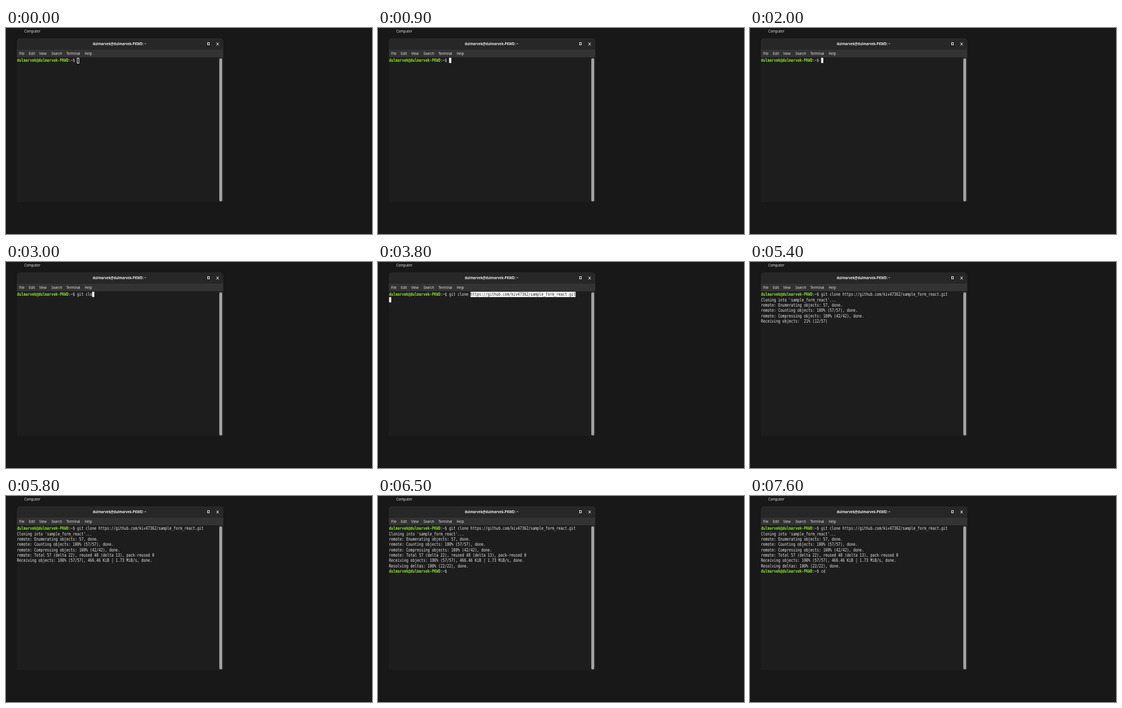
Write an HTML page with a canvas that moves like this. It is 640 px wide and 360 px high and loops after 8 s.

```html
<!DOCTYPE html>
<html lang="en">
<head>
<meta charset="utf-8">
<title>Terminal</title>
<style>
  html, body { margin: 0; width: 100%; height: 100%; overflow: hidden; background: #181818; }
  canvas { display: block; width: 640px; height: 360px; }
</style>
</head>
<body>
<canvas id="stage" width="640" height="360"></canvas>
<script>
const ctx = document.getElementById('stage').getContext('2d');
const LOOP = 8000;

// The desktop is shown narrower than its natural aspect.
const ASPECT = 1.28;
const LEFT = 19.2, TOP = 52, CELL = 3.75, ROW = 9.35;
const MONO = '6.25px "DejaVu Sans Mono", monospace';
const UI = '5.9px "Noto Sans", sans-serif';

const USER = 'dulmarvek';
const LOGIN = USER + '@' + USER + '-PKWD';
const PROMPT_COLS = LOGIN.length + 4;
const CLONE = 'git clone ';
const URL_TEXT = 'https://github.com/kiv47362/sample_form_react.git';

// [time, text] pairs: the last one reached is shown
const TYPED = [[0, ''], [2100, 'g'], [2200, 'gi'], [2300, 'git'], [2600, 'git c'],
  [2700, 'git cl'], [3000, 'git clo'], [3300, CLONE], [3800, CLONE + URL_TEXT]];
const TYPED_NEXT = [[0, ''], [6800, 'c'], [7100, 'cd']];

// [time, row, column, style] of the text cursor
const CURSOR = [[0, 0, 0, 'hollow'], [800, 0, 0, 'solid'], [1400, 0, 0, ''], [2000, 0, 0, 'solid'],
  [3800, 1, 0, 'solid'], [4000, 2, 0, 'solid'], [4800, 0, 0, ''],
  [6000, 8, 0, 'solid'], [6200, 8, 0, ''], [6800, 8, 0, 'solid'], [7600, 8, 0, '']];

const at = (list, t) => list.reduce((cur, item) => item[0] <= t ? item : cur);

function box(x, y, w, h, color, radius = 0) {
  ctx.fillStyle = color;
  ctx.beginPath();
  ctx.roundRect(x, y, w, h, radius);
  ctx.fill();
}

function text(str, x, y, font, color) {
  ctx.save();
  ctx.translate(x, y);
  ctx.scale(1, ASPECT);
  ctx.font = font;
  ctx.fillStyle = color;
  ctx.fillText(str, 0, 0);
  ctx.restore();
}

function cells(str, row, col = 0, color = '#e8e8e8', weight = '') {
  [...str].forEach((ch, i) => {
    if (ch !== ' ') text(ch, LEFT + (col + i) * CELL, TOP + row * ROW + 7.3, weight + MONO, color);
  });
}

function prompt(row) {
  cells(LOGIN, row, 0, '#8ae234', 'bold ');
  cells(':', row, LOGIN.length);
  cells('~', row, LOGIN.length + 1, '#a9bdd6', 'bold ');
  cells('$', row, LOGIN.length + 2);
}

function drawDesktop() {
  box(0, 0, 640, 360, '#181818');
  text('Computer', 32, 8.2, UI, '#e6e6e6');

  box(19, 18, 361, 30, '#272727', [5, 5, 0, 0]);
  box(19, 38, 361, 13.5, '#333333');
  box(19, 51.5, 361, 252.5, '#1d1d1d');
  box(372, 51.5, 8, 252.5, '#262626');
  box(373, 53, 5, 250, '#a2a2a2', 2.5);

  ctx.textAlign = 'center';
  text(LOGIN + ': ~', 198.5, 30.3, 'bold 5.8px "Noto Sans", sans-serif', '#ececec');
  ctx.textAlign = 'left';
  const menu = { File: 23, Edit: 40, View: 58, Search: 79.5, Terminal: 105.5, Help: 137.5 };
  for (const name in menu) text(name, menu[name], 47.3, UI, '#e2e2e2');

  ctx.strokeStyle = '#f0f0f0';
  ctx.lineWidth = 1;
  ctx.strokeRect(352.5, 25.5, 3, 4);
  ctx.beginPath();
  ctx.moveTo(368, 25.5); ctx.lineTo(372, 30.5);
  ctx.moveTo(372, 25.5); ctx.lineTo(368, 30.5);
  ctx.stroke();
}

function output(t) {
  const lines = [];
  const add = (time, str) => { if (t >= time) lines.push(str); };
  add(4000, "Cloning into 'sample_form_react'...");
  add(4800, 'remote: Enumerating objects: 57, done.');
  add(4900, 'remote: Counting objects: 100% (57/57), done.');
  add(5000, 'remote: Compressing objects: 100% (42/42), done.');
  add(5800, 'remote: Total 57 (delta 22), reused 48 (delta 13), pack-reused 0');
  if (t < 5800) {
    const got = 12 * (1 + Math.floor((t - 5400) / 100));
    const pct = Math.floor(got / 57 * 100);
    add(5400, `Receiving objects:  ${pct}% (${got}/57)`);
  }
  add(5800, 'Receiving objects: 100% (57/57), 466.46 KiB | 1.73 MiB/s, done.');
  add(5900, 'Resolving deltas: 100% (22/22), done.');
  return lines;
}

function drawCursor(t, cols) {
  const [, row, , style] = at(CURSOR, t);
  const x = LEFT + cols[row] * CELL, y = TOP + row * ROW;
  if (style === 'solid') box(x + 0.2, y, CELL, 9.2, '#ffffff');
  if (style === 'hollow') {
    ctx.strokeStyle = '#e8e8e8';
    ctx.lineWidth = 1;
    ctx.strokeRect(Math.round(x) + 0.5, y + 0.5, 3, 9);
  }
}

function draw(t) {
  drawDesktop();
  const typed = at(TYPED, t)[1], next = at(TYPED_NEXT, t)[1];
  prompt(0);
  if (t >= 3800 && t < 3900) {
    const col = PROMPT_COLS + CLONE.length;
    cells(CLONE, 0, PROMPT_COLS);
    box(LEFT + col * CELL, TOP, URL_TEXT.length * CELL, 9.2, '#ffffff');
    cells(URL_TEXT, 0, col, '#1d1d1d');
  } else {
    cells(typed, 0, PROMPT_COLS);
  }
  output(t).forEach((line, i) => cells(line, i + 1));
  if (t >= 6000) {
    prompt(8);
    cells(next, 8, PROMPT_COLS);
  }
  drawCursor(t, { 0: PROMPT_COLS + typed.length, 1: 0, 2: 0, 8: PROMPT_COLS + next.length });
}

const start = performance.now();
function tick() {
  draw((performance.now() - start) % LOOP);
  requestAnimationFrame(tick);
}
tick();
</script>
</body>
</html>
```
